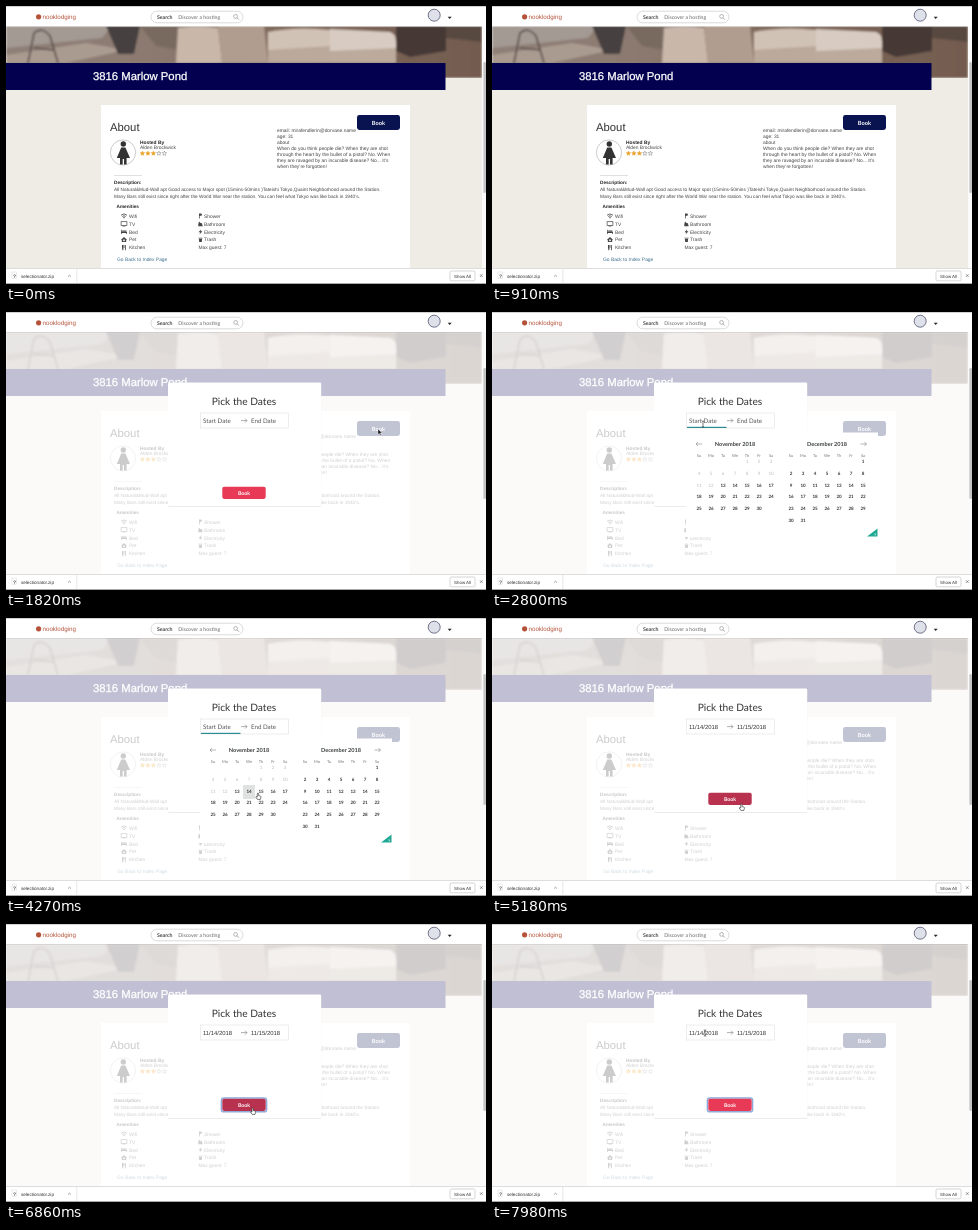
These frames come from a looping animation (480x278 px, 8000 ms). An HTML page:

```html
<!DOCTYPE html>
<html lang="en">
<head>
<meta charset="utf-8">
<title>Booking dates</title>
<style>
html, body { margin: 0; width: 100%; height: 100%; overflow: hidden; background: #fff; }
svg { display: block; width: 100%; height: 100%; }
text { font-family: "Liberation Sans", Arial, sans-serif; text-rendering: geometricPrecision; white-space: pre; }
.l { font-family: Lato, sans-serif; }
.b { font-weight: 700; }
.m { text-anchor: middle; }
.thick { stroke: #fff; stroke-width: .3; }
</style>
</head>
<body>
<svg id="stage" viewBox="0 0 480 278"></svg>
<script>
const LOOP = 8000;
const INK = '#444';
const rect = (x, y, w, h, fill, more = '') =>
  `<rect x="${x}" y="${y}" width="${w}" height="${h}" fill="${fill}" ${more}/>`;
const path = (d, fill, more = '') => `<path d="${d}" fill="${fill}" ${more}/>`;
const line = (d, stroke, w = 0.6) => path(d, 'none', `stroke="${stroke}" stroke-width="${w}"`);
const text = (x, y, size, s, fill = INK, cls = '') =>
  `<text x="${x}" y="${y}" font-size="${size}" fill="${fill}" class="${cls}">${s.replace(/&/g, '&amp;')}</text>`;
const group = (id, body, more = '') => `<g id="${id}" ${more}>${body}</g>`;

function photo() {
  return `<defs><linearGradient id="floor"><stop offset="0" stop-color="#8f8078"/>
    <stop offset=".3" stop-color="#8c7a70"/><stop offset=".65" stop-color="#7d6557"/>
    <stop offset="1" stop-color="#735c50"/></linearGradient>
    <filter id="blur" x="0" y="0" width="1" height="1"><feGaussianBlur stdDeviation=".9"/></filter></defs>` +
    '<g filter="url(#blur)">' + rect(0, 20, 476, 52, 'url(#floor)') +
    path('M0 20H106L96 32L0 42Z', '#a39a93') +
    path('M0 49L80 37L120 44L60 57H0Z', '#aa9b90') +
    line('M22 57L28 27Q36 20 44 30L52 57M28 42L48 44', '#574a45', 1.6) +
    path('M100 20H134L128 48H112Z', '#46403f') +
    path('M134 20H172V44L150 40Z', '#796a61') +
    path('M172 22Q192 19 212 22L216 57H170Z', '#c9b8aa') +
    path('M212 20H258L262 57H216Z', '#b19d8f') +
    path('M262 26Q292 20 324 24V57H262Z', '#d1c2b6') +
    path('M262 44L324 40V57H262Z', '#bba99b') +
    path('M324 23L384 26Q390 28 390 36V57H324Z', '#d8ccc2') +
    path('M324 45L390 42V57H324Z', '#bcaa9c') +
    path('M390 20H440V45L404 51L390 45Z', '#443936') +
    path('M440 20H476V36L440 32Z', '#594940') + '</g>';
}

function star(cx, cy, r, on) {
  const pts = Array.from({ length: 10 }, (_, i) => {
    const a = i * Math.PI / 5 - Math.PI / 2, q = i % 2 ? r * 0.42 : r;
    return (cx + q * Math.cos(a)).toFixed(2) + ',' + (cy + q * Math.sin(a)).toFixed(2);
  });
  return `<polygon points="${pts.join(' ')}" fill="${on ? '#f0a020' : '#fff'}" stroke="${on ? '#e09a20' : '#666'}" stroke-width=".4"/>`;
}

const icons = {
  Wifi: line('M-3 -.8Q0 -3.4 3 -.8M-1.8 .5Q0 -1 1.8 .5', INK, .8) + rect(-.6, 1, 1.2, 1.2, INK),
  TV: rect(-2.9, -2.2, 5.8, 3.7, 'none', `stroke="${INK}" stroke-width=".7"`) + rect(-1.5, 1.9, 3, .6, INK),
  Bed: path('M-3 -2H-2.3V0H3V2.2H2.3V1.2H-2.3V2.2H-3ZM-1.8 -1.2H2.4V-.4H-1.8Z', INK),
  Pet: path('M-3 0L0 -2.6L3 0L2.2 .2V2.3H-2.2V.2Z', INK) + rect(-.8, -.2, 1.6, 1.7, '#fff'),
  Kitchen: path('M-2 -2.5H-.4V0L-.8 2.6H-1.6L-2 0ZM.6 -2.5H1.8V2.6H1V.4H.6Z', INK),
  Shower: path('M-1.5 -2.4H.8L1.8 -.8L-.8 0V2.4H-1.5Z', INK),
  Bathroom: path('M-1.5 -2.4L0 -1L1.4 -.6L2.2 2.3H-2.2V.4Z', INK),
  Electricity: path('M.8 -2.6L-2 .4H-.2L-1 2.6L2 -.6H.2Z', INK),
  Trash: path('M-2 -2H2V-1.2H-2ZM-1.6 -.8H1.6L1.3 2.4H-1.3Z', INK)
};

function amenities() {
  const cols = [[118, 123, ['Wifi', 'TV', 'Bed', 'Pet', 'Kitchen']],
    [194.5, 198, ['Shower', 'Bathroom', 'Electricity', 'Trash']]];
  return cols.map(([ix, tx, names]) => names.map((n, i) => {
    const y = 210 + i * 7.9;
    return `<g transform="translate(${ix} ${y})">${icons[n]}</g>` + text(tx, y + 1.7, 4.9, n);
  }).join('')).join('') + text(192.5, 243.3, 4.9, 'Max guest: 7');
}

function page() {
  const bio = ['email: mirafendlerin@dorvane.name', 'age: 31', 'about', 'When do you think people die? When they are shot',
    'through the heart by the bullet of a pistol? No. When', 'they are ravaged by an incurable disease? No... It\u2019s', 'when they\u2019re forgotten!'];
  return rect(0, 20, 476, 242, '#eeece5') + photo() +
    rect(0, 57, 439.5, 27, '#02004f') +
    text(87, 74.3, 11.3, '3816 Marlow Pond', '#fff', 'thick') +
    rect(95, 99, 309, 164, '#fff') +
    text(104, 125, 11.3, 'About', '#333') +
    '<circle cx="117" cy="146.5" r="12.6" fill="#fff" stroke="#aaa" stroke-width=".6"/>' +
    '<circle cx="117.3" cy="138" r="2.7" fill="#333"/>' +
    path('M115.2 141.5H119.4L124 152H120.6V158.5H118V153H116.7V158.5H114V152H110.8Z', '#333') +
    text(134, 137.6, 4.9, 'Hosted By', '#222', 'b') +
    text(134, 143.4, 4.9, 'Alden Brockwick') +
    [0, 1, 2, 3, 4].map(i => star(136.4 + i * 5.5, 147.4, 2.4, i < 3)).join('') +
    bio.map((s, i) => text(271, 125.8 + i * 6, 4.9, s)).join('') +
    line('M108 169.5H136', '#ccc') +
    text(108, 178, 4.7, 'Description:', '#222', 'b') +
    text(108, 185.4, 4.75, 'All Natural&Mud-Wall apt Good access to Major spot (15mins-50mins )Tateishi Tokyo,Quaint Neighborhood around the Station.') +
    text(108, 192, 4.75, 'Many Bars still exist since right after the World War near the station. You can feel what Tokyo was like back in 1940\u2019s.') +
    text(110.5, 202, 4.7, 'Amenities', '#222', 'b') + amenities() +
    text(111, 254.8, 4.9, 'Go Back to Index Page', '#3f6f8f') +
    rect(350.2, 108.2, 44.6, 16.6, 'none', 'id="ring" rx="3" stroke="#a3b6dc" stroke-width="1.6"') +
    rect(351, 109, 43, 15, '#08134f', 'id="open" rx="2.4"') +
    text(372.5, 118.5, 5.7, 'Book', '#fff', 'l b m');
}

function header() {
  return rect(0, 0, 480, 20, '#fff') + rect(0, 0, 480, 1, '#d2d2d2') + rect(0, 20, 476, .6, '#dedede') +
    '<circle cx="32.6" cy="10.8" r="2.6" fill="#b5533a"/>' +
    text(36.5, 12.7, 6.2, 'nooklodging', '#b5533a') +
    rect(145, 5.2, 92, 11.6, '#fff', 'rx="5.8" stroke="#ccc" stroke-width=".7"') +
    text(151, 12.9, 5.2, 'Search', INK, 'l b') +
    text(172.3, 12.9, 5.2, 'Discover a hosting', '#666', 'l') +
    '<circle cx="229.6" cy="10.4" r="1.9" fill="none" stroke="#999" stroke-width=".7"/>' +
    line('M231 11.8L232.9 13.7', '#999', .8) +
    '<circle cx="428.2" cy="9.2" r="6" fill="#dfe1ea" stroke="#50546e" stroke-width=".8"/>' +
    path('M441.7 10.8H445.7L443.7 13Z', '#222');
}

function footer() {
  return rect(0, 262, 480, 16, '#fff') + rect(0, 262, 480, .7, '#cfcfcf') + rect(0, 277, 480, 1, '#aaa') +
    rect(6, 266, 4.6, 6.6, '#fff', 'stroke="#ccc" stroke-width=".4"') + text(7, 271.6, 5, '?', '#555', 'b') +
    text(15, 271.8, 4.6, 'selectionator.zip', '#333') +
    line('M62 270.6L63.5 269.2L65 270.6', '#666', .6) + line('M70.8 263V277', '#d5d5d5') +
    rect(444, 265, 25, 9.8, '#fff', 'rx="1.4" stroke="#bbb" stroke-width=".6"') +
    text(456.5, 271.5, 4.4, 'Show All', '#333', 'm') +
    line('M474 268.3L476.6 270.9M476.6 268.3L474 270.9', '#555', .6) +
    rect(476, 20.5, 4, 241.5, '#fafafa') + rect(477.4, 56, 2.6, 131, '#c3c3c3', 'rx="1.2"');
}

function month(name, x0, first, days, pastTo) {
  let s = text(x0 + 36, 133.9, 5.6, name + ' 2018', '#3c3f40', 'l b m');
  'Su Mo Tu We Th Fr Sa'.split(' ').forEach((d, i) => s += text(x0 + i * 12, 144.9, 4, d, '#757575', 'l m'));
  for (let d = 1; d <= days; d++) {
    const k = d - 1 + first;
    const past = d <= pastTo;
    s += text(x0 + k % 7 * 12, 151.2 + Math.floor(k / 7) * 11.7, 4.5, String(d), past ? '#bbb' : '#333', past ? 'l m' : 'l b m');
  }
  return s;
}

function arrow(x, y, dir, c) {
  return line(`M${x - 3 * dir} ${y}H${x + 3 * dir}M${x + 1 * dir} ${y - 2}L${x + 3 * dir} ${y}L${x + 1 * dir} ${y + 2}`, c, .6);
}

function modal() {
  return rect(162, 70.5, 153.2, 123.5, '#fff', 'rx="1.4" filter="url(#soft)"') +
    text(238, 93, 10.2, 'Pick the Dates', '#333', 'l m') +
    rect(194.3, 101, 88, 15, '#fff', 'stroke="#e2e2e2" stroke-width=".6"') +
    arrow(238, 108.6, 1, '#777') +
    '<text id="from" x="197" y="110.6"/><text id="to" x="245" y="110.6"/>' +
    rect(215.4, 173.9, 45.2, 13.9, 'none', 'id="focus" rx="2.4" stroke="#8fa9d8" stroke-width="1.5"') +
    rect(216.3, 174.8, 43.4, 12.1, '#e83a56', 'id="book" rx="1.8"') +
    text(238, 182.7, 5.2, 'Book', '#fff', 'l b m') +
    group('cal',
      rect(194, 120.5, 192, 104.5, '#fff') +
      rect(237, 167, 12, 14, '#e0e2e2', 'id="cell"') +
      arrow(207, 132, -1, '#82888a') + arrow(371.5, 132, 1, '#82888a') +
      month('November', 207, 4, 30, 12) + month('December', 299, 6, 31, 0) +
      path('M385.5 216.5V224.5H375Z', '#20a894') + text(382, 223.6, 3.6, '?', '#fff', 'b')) +
    rect(195, 114.8, 39.5, 1.2, '#2c8c92', 'id="under"');
}

function dialog() {
  return rect(0, 20.6, 476, 241.4, '#fff', 'opacity=".77"') +
    rect(187.5, 122, 101, 19.6, '#fff', 'rx="1.4" stroke="#e4e4e4" stroke-width=".6" filter="url(#soft)"') +
    text(238, 133.9, 5.1, 'Oops Someone already book those dates!', '#222', 'l b m');
}

const cursors =
  group('arrow', path('M0 0V5.6L1.3 4.4L2.2 6.3L3.1 5.9L2.2 4.1H3.9Z', '#111', 'stroke="#fff" stroke-width=".4"')) +
  group('hand', path('M-.7 -2.6Q0 -3.4 .6 -2.6V-.5L2.6 .1Q3.1 .4 2.9 1.5L2.3 3.4H-.6L-2.3 1Q-2.2 0 -.7 1Z', '#fff', 'stroke="#222" stroke-width=".6"')) +
  group('beam', line('M-1.2 -3.2Q0 -3.2 0 -2.4V2.4Q0 3.2 -1.2 3.2M1.2 -3.2Q0 -3.2 0 -2.4M0 2.4Q0 3.2 1.2 3.2', '#222', .6));

const stage = document.getElementById('stage');
stage.innerHTML =
  '<defs><filter id="soft" x="-10%" y="-20%" width="120%" height="140%"><feDropShadow dx="0" dy=".5" stdDeviation=".7" flood-opacity=".16"/></filter></defs>' +
  rect(0, 0, 480, 278, '#fff') + page() +
  group('pick', rect(0, 20.6, 476, 241.4, '#fff', 'opacity=".75"') + modal()) +
  group('oops', dialog()) + header() + footer() + group('cursor', cursors);

const el = id => document.getElementById(id);
const show = (id, on) => el(id).setAttribute('visibility', on ? 'inherit' : 'hidden');

// time, x, y of the pointer
const route = [[910, 483, 165], [1540, 372, 117], [1930, 372, 117], [2100, 290, 117], [2210, 288, 117], [2590, 211, 112],
  [2900, 211, 112], [3710, 244, 187], [3990, 244, 187], [4060, 242, 178], [4130, 242, 178], [4200, 252, 178],
  [4550, 252, 178], [4690, 257, 175], [4830, 258, 194], [4930, 258, 194], [5320, 246, 187],
  [5460, 246, 187], [5740, 256, 144], [6270, 256, 144], [6650, 246.5, 187], [7170, 247, 187], [7910, 213, 109]];
// time from which each pointer shape holds
const shapes = [[0, 'hand'], [1820, 'arrow'], [2380, 'beam'], [3010, 'arrow'], [3430, 'hand'], [4620, 'arrow'],
  [5110, 'hand'], [5460, 'arrow'], [6580, 'hand'], [7280, 'arrow'], [7770, 'beam']];

function pointer(t) {
  const i = route.findIndex(p => p[0] > t);
  if (i < 0) return route[route.length - 1].slice(1);
  if (i === 0) return route[0].slice(1);
  const [t0, x0, y0] = route[i - 1], [t1, x1, y1] = route[i];
  const u = (t - t0) / (t1 - t0), k = u * u * (3 - 2 * u);
  return [x0 + (x1 - x0) * k, y0 + (y1 - y0) * k];
}

function field(id, label, date, set) {
  const e = el(id);
  e.textContent = set ? date : label;
  e.setAttribute('class', set ? '' : 'l');
  e.setAttribute('font-size', set ? 5.9 : 6.2);
  e.setAttribute('fill', set ? '#333' : '#555');
}

function draw(t) {
  const within = (a, b) => t >= a && t < b;
  const pressed = within(1680, 1820);
  show('ring', pressed);
  el('open').setAttribute('fill', pressed ? '#1f2658' : '#08134f');
  show('pick', t >= 1820);
  show('oops', within(5460, 6790));

  const calendar = within(2800, 4550);
  const chosen = t >= 4410;
  show('cal', calendar);
  show('under', calendar);
  el('under').setAttribute('x', chosen ? 243 : 195);
  show('cell', within(3500, 4550));
  el('cell').setAttribute('y', t < 4060 ? 179 : 167);
  el('cell').setAttribute('fill', chosen ? '#20a894' : '#e0e2e2');
  field('from', 'Start Date', '11/14/2018', chosen);
  field('to', 'End Date', '11/15/2018', t >= 4550);

  const over = within(5110, 5460) || within(6720, 7280);
  el('book').setAttribute('fill', over ? '#b8324f' : '#e83a56');
  show('focus', t >= 5320 && !within(5460, 6790));

  const [x, y] = pointer(t);
  el('cursor').setAttribute('transform', `translate(${x.toFixed(2)} ${y.toFixed(2)})`);
  const shape = shapes.filter(s => s[0] <= t).pop()[1];
  ['arrow', 'hand', 'beam'].forEach(id => show(id, id === shape));
}

const start = performance.now();
function tick() {
  draw((performance.now() - start) % LOOP);
  requestAnimationFrame(tick);
}
tick();
</script>
</body>
</html>
```
